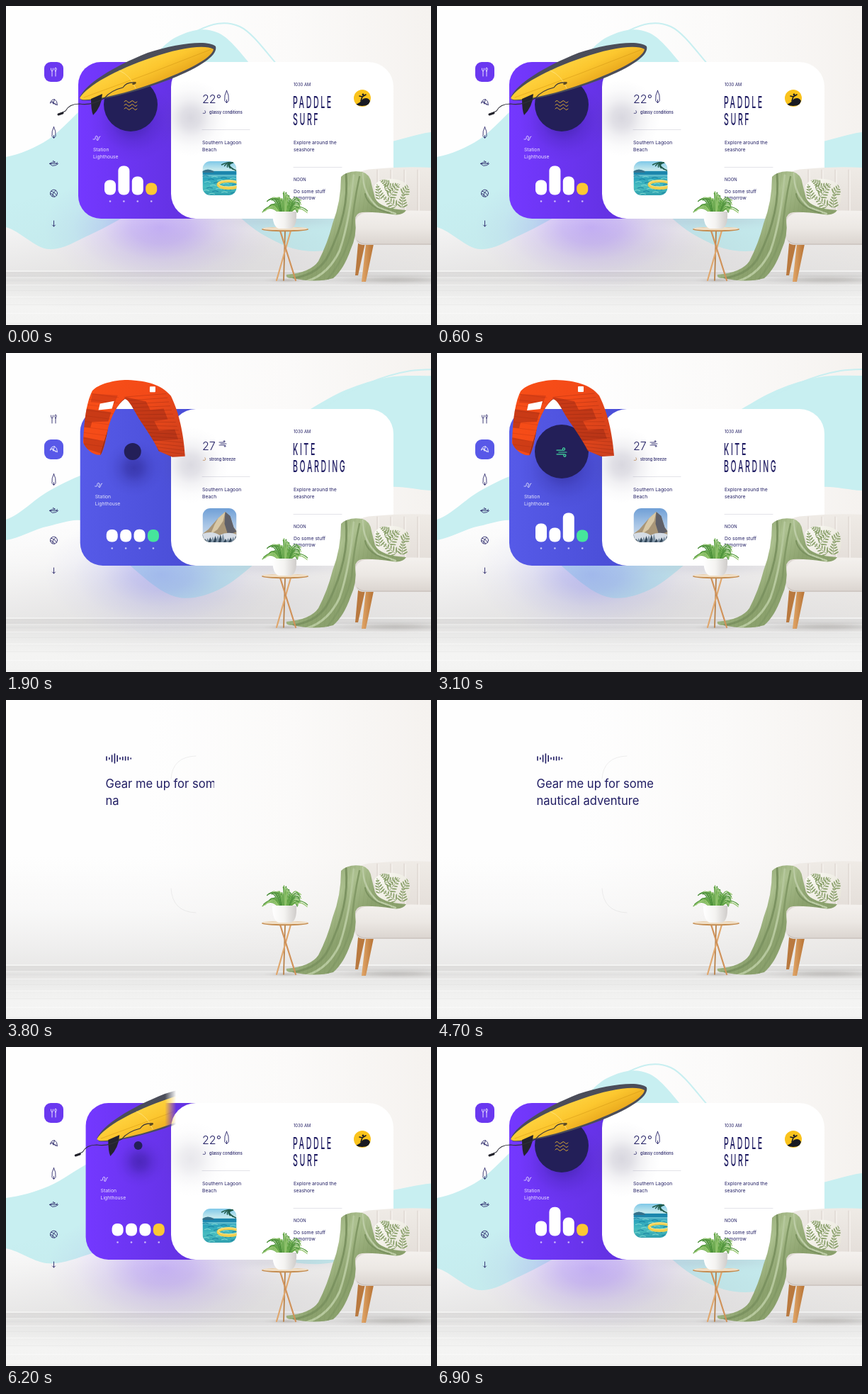
An HTML page with a canvas that plays this animation: 600x450 px, repeating every 7000 ms.

```html
<!DOCTYPE html>
<html lang="en">
<head>
<meta charset="utf-8">
<title>Gear wall</title>
<style>
html, body { margin: 0; width: 100%; height: 100%; overflow: hidden; background: #fff; }
canvas { display: block; width: 600px; height: 450px; }
</style>
</head>
<body>
<canvas id="stage" width="600" height="450"></canvas>
<script>
const W = 600, H = 450, LOOP = 7000, STEP = 100;
const FONT = 'Inter, "Open Sans", sans-serif';
const NAVY = '#201d63', CYAN = '#c8eff1', CARD = { x: 233, y: 79, w: 314, h: 221 };

const makeLayer = () => Object.assign(document.createElement('canvas'), { width: W, height: H }).getContext('2d');
const stage = document.getElementById('stage').getContext('2d');
const gearLayer = makeLayer();
let c = stage;

// Timing helpers
const lin = p => p, easeIn = p => p * p, smooth = p => p * p * (3 - 2 * p), easeOut = p => 1 - (1 - p) ** 4;
const mix = (a, b, p) => Array.isArray(a) ? a.map((v, i) => mix(v, b[i], p)) : a + (b - a) * p;
function track(t, keys) {
  if (t <= keys[0][0]) return keys[0][1];
  for (let i = 1; i < keys.length; i++) {
    const [t0, a] = keys[i - 1], [t1, b, ease = smooth] = keys[i];
    if (t < t1) return mix(a, b, ease((t - t0) / (t1 - t0)));
  }
  return keys[keys.length - 1][1];
}
const cardOpen = t => track(t, [[3220, 1], [3620, 0], [5380, 0], [5980, 1]]);

// Drawing helpers
const shape = d => new Path2D(d);
function fill(path, color) { c.fillStyle = color; c.fill(path); }
function line(d, color, width = 1) {
  c.strokeStyle = color; c.lineWidth = width; c.lineCap = c.lineJoin = 'round';
  c.stroke(shape(d));
}
function box(x, y, w, h, r, color) {
  const p = new Path2D();
  p.roundRect(x, y, w, h, r);
  if (color) fill(p, color);
  return p;
}
function oval(x, y, rx, ry, color, turn = 0) {
  const p = new Path2D();
  p.ellipse(x, y, rx, ry, turn, 0, 7);
  if (color) fill(p, color);
  return p;
}
function ramp(x0, y0, x1, y1, ...colors) {
  const g = c.createLinearGradient(x0, y0, x1, y1);
  colors.forEach((v, i) => g.addColorStop(i / (colors.length - 1), v));
  return g;
}
function blur(x, y, rx, ry, rgb, alpha) {
  c.save();
  c.translate(x, y); c.scale(rx, ry);
  const g = c.createRadialGradient(0, 0, 0, 0, 0, 1);
  [1, .78, .35, .1, 0].forEach((k, i) => g.addColorStop(i / 4, `rgba(${rgb},${alpha * k})`));
  c.fillStyle = g; c.fillRect(-1, -1, 2, 2);
  c.restore();
}
function text(s, x, y, size = 6.8, color = NAVY, weight = 400) {
  c.font = `${weight} ${size}px ${FONT}`;
  c.fillStyle = color;
  c.fillText(s, x, y);
}
function heading(s, x, y) {
  c.save();
  c.translate(x, y); c.scale(.45, 1);
  c.letterSpacing = '5.8px';
  text(s, 0, 0, 23.5, NAVY, 500);
  c.restore();
}
function inside(path, draw) {
  c.save(); c.clip(path); draw(); c.restore();
}

// Room
function wall() {
  c.fillStyle = ramp(0, 0, W, 0, '#fefefe', '#fefefe', '#fbfaf9', '#f5f2ef');
  c.fillRect(0, 0, W, H);
  c.fillStyle = ramp(0, 220, 0, 374, 'rgba(225,224,223,0)', 'rgba(224,223,222,.2)', 'rgba(220,219,218,.6)');
  c.fillRect(0, 220, W, 154);
  c.fillStyle = ramp(0, 374, 0, 450, '#dddcdb', '#ebebea', '#f4f4f3', '#f3f3f2');
  c.fillRect(0, 374, W, 76);
  c.fillStyle = '#f3f3f2'; c.fillRect(0, 373, W, 2);
  for (let i = 0; i < 9; i++) {
    c.fillStyle = i % 2 ? 'rgba(255,255,255,.5)' : 'rgba(200,199,197,.2)';
    c.fillRect(0, 380 + i * i * .8 + i * 2, W, 1);
  }
}

function fern(x, y, turn, size) {
  c.save();
  c.translate(x, y); c.rotate(turn);
  line(`M0 0V${-size}`, '#7e955f', .7);
  for (let k = .1; k < 1; k += .18)
    for (const side of [-1, 1])
      oval(side * size * .18 * (1.2 - k), -size * k, size * .19 * (1.15 - k), .95, '#8ba16c', -side * .6);
  c.restore();
}

function sofa() {
  blur(550, 386, 120, 10, '120,115,110', .3);
  fill(shape('M497 335H507L497 380H493Z'), '#b9793f');
  fill(shape('M508 336H519L508 389H502Z'), ramp(504, 0, 518, 0, '#dda163', '#b87537'));
  fill(shape('M488 250Q492 231 518 230Q560 226 600 228V320H495Z'), ramp(0, 228, 0, 300, '#efebe6', '#e3ddd8'));
  for (let x = 524; x < 600; x += 19) {
    line(`M${x} 231V292`, '#dad2cc');
    line(`M${x + 2} 232V290`, '#f5f1ed', 1.5);
  }
  fill(shape('M482 250Q482 243 490 247Q500 257 501 296L500 333Q492 333 488 315Z'), '#dfd9d4');
  fill(shape('M506 292Q550 287 600 289V337H503Q494 336 493 326V306Q495 294 506 292Z'),
    ramp(0, 288, 0, 337, '#f4f1ee', '#ece8e4', '#dad4cf'));
  line('M496 331Q500 336 510 336H600', '#bfb7b1', .8);

  const pillow = shape('M520 254Q526 242 547 244Q568 246 570 262Q574 284 556 286Q528 291 523 276Z');
  fill(pillow, ramp(520, 245, 570, 285, '#fbfaf4', '#e7e4d9'));
  inside(pillow, () => {
    [[528, 272, -.2, 21], [541, 269, .7, 23], [535, 258, 1.2, 20], [550, 283, -.9, 23],
     [559, 284, .1, 21], [561, 265, .6, 20], [540, 252, -1, 16]].forEach(a => fern(...a));
  });
}

function blanket() {
  const cloth = shape('M473 241Q483 231 503 234Q514 237 516 251L521 271Q528 286 565 288Q560 296 546 294Q518 290 503 291Q493 292 493 302Q496 324 486 345Q477 371 462 384Q438 391 404 384Q394 384 396 379Q430 376 441 360Q454 335 461 307Q473 276 473 241Z');
  fill(cloth, ramp(440, 240, 505, 300, '#8ba26e', '#acc08f', '#8ba16d'));
  inside(cloth, () => {
    line('M480 237Q485 290 456 350Q443 378 406 384', '#7c9361', 3);
    line('M491 239Q486 300 471 345Q455 379 425 388', '#b7c99e', 3);
    line('M499 241Q490 282 488 315Q480 354 453 387', '#839a67', 2.5);
    line('M504 236Q503 264 525 284L550 293', '#bccca5', 2.5);
    line('M507 265Q510 284 542 292', '#7c9361', 2);
    for (let i = 0; i < 26; i++) line(`M${395 + i * 6} 388l20 -155`, 'rgba(96,120,70,.13)', .7);
  });
}

function tableAndPlant() {
  blur(396, 387, 34, 4, '120,110,100', .3);
  line('M394 317L392 387', '#b67d43', 1.7);
  line('M402 317L382 387', '#dfa76e', 2.2);
  line('M387 317L409 387', '#d0925a', 2.2);
  oval(394, 315, 33, 3.3, '#c48c50');
  oval(394, 314, 32, 2.3, '#f0dec5');
  for (let i = 0; i < 52; i++) {
    const a = Math.PI * (.03 + .94 * ((i * .618) % 1)), len = 17 + (i * 7) % 15;
    const root = 393 + Math.cos(a) * 8, dx = Math.cos(a) * len, dy = Math.sin(a) * len * .85;
    line(`M${root} 292Q${root + dx * .4} ${283 - dy} ${393 + dx * 1.08} ${289 - dy + Math.abs(dx) * .2}`,
      ['#4b8f3a', '#70b04f', '#9cca76', '#5c9f45'][i % 4], 1.3);
  }
  fill(shape('M376 290H410Q411 312 402 314H385Q376 311 376 290Z'), ramp(376, 0, 410, 0, '#fff', '#f4f3f1', '#cfccca'));
}

function cache(draw) {
  const layer = makeLayer();
  c = layer; draw(); c = stage;
  return layer.canvas;
}
const back = cache(wall);
const front = cache(() => { sofa(); blanket(); tableAndPlant(); });

// Waves: top and bottom heights at every 60 px
const SURF = [[213, 188, 134, 98, 44, 38, 100, 165, 200, 192, 178], [312, 343, 322, 290, 255, 275, 321, 345, 335, 280, 245]];
const MID = [[215, 215, 185, 114, 70, 46, 32, 50, 130, 190, 178], [318, 344, 313, 274, 270, 284, 322, 345, 346, 280, 232]];
const KITE = [[235, 195, 168, 162, 160, 150, 122, 85, 52, 34, 32], [264, 244, 240, 304, 344, 334, 290, 240, 205, 189, 194]];
const FLAT = [[213, 213, 217, 222, 222, 220, 219, 221, 225, 224, 221], [230, 232, 232, 229, 226, 228, 229, 229, 229, 228, 227]];
const NONE = FLAT.map(edge => edge.map(() => 223));

function curve(path, ys, back) {
  const last = ys.length - 1, at = i => ys[Math.max(0, Math.min(last, i))];
  const dir = back ? -1 : 1, start = back ? last : 0;
  path.lineTo(start * 60, ys[start]);
  for (let n = 0; n < last; n++) {
    const i = start + n * dir, j = i + dir;
    path.bezierCurveTo((i + dir / 3) * 60, at(i) + (at(j) - at(i - dir)) / 6,
      (j - dir / 3) * 60, at(j) - (at(j + dir) - at(i)) / 6, j * 60, at(j));
  }
}
function waves(t) {
  const [top, bottom] = track(t, [[650, SURF], [1100, MID, easeIn], [2100, KITE, easeOut], [3200, KITE],
    [3600, NONE], [5300, NONE], [5500, FLAT], [6650, SURF]]);
  if (bottom[0] - top[0] < 1) return;
  const body = new Path2D(), edge = new Path2D();
  curve(body, top); curve(body, bottom, true);
  curve(edge, top);
  fill(body, CYAN);
  c.save();
  c.translate(30, -9);
  c.strokeStyle = CYAN; c.lineWidth = 2;
  c.globalAlpha = Math.min(1, (bottom[0] - top[0]) / 30);
  c.beginPath(); c.rect(210, 0, 400, 110); c.clip();
  c.stroke(edge);
  c.restore();
}

// Icons, centred on the origin
const ICONS = {
  oars: 'M-2.5 -1V6M2.5 -1V6M-4 -5Q-4 -1 -2.5 -1Q-1 -1 -1 -5M2.5 -1Q0 -5 2.5 -6Q5 -5 2.5 -1',
  kite: 'M-5 1Q-4 -4 1 -4Q5 -2 5 4Q2 1 -1 2L-2 -1L-5 1M-2 -1L3 4M1 -4L-1 2',
  board: 'M0 -8Q-3.4 -2 -2.5 5L0 8L2.5 5Q3.4 -2 0 -8M0 4V7',
  ski: 'M-6 1H6Q4 4 -2 4L-6 1L-2 -1H2L-1 -3M3 1L5 -1',
  ball: 'M5 0A5 5 0 1 1 -5 0A5 5 0 1 1 5 0M-4 -3Q1 -2 4 3M-2 4Q-1 -2 3 -4M-5 1Q-2 -1 1 5',
  down: 'M0 -4V4M-2 2L0 4L2 2',
  wind: 'M-5 -2H1Q4 -2 3 -4Q1 -5 1 -3M-3 0H5M-5 2H2Q5 2 4 4Q2 5 2 3',
  sea: 'M-9 -5q2.2 -3 4.5 0t4.5 0t4.5 0t4.5 0M-9 0q2.2 -3 4.5 0t4.5 0t4.5 0t4.5 0M-9 5q2.2 -3 4.5 0t4.5 0t4.5 0t4.5 0',
  route: 'M-5 2H-3Q-1 2 -2 -1Q-1 -4 1 -2Q2 0 0 3Q2 5 3 1Q3 -2 5 -2',
  leaf: 'M-2 2H1Q3 1 1 -2'
};
function icon(name, x, y, color = NAVY, scale = 1, width = .85) {
  c.save();
  c.translate(x, y); c.scale(scale, scale);
  line(ICONS[name], color, width);
  c.restore();
}

function menu(t) {
  const alpha = track(t, [[3200, 1], [3500, 0], [5700, 0], [6200, 1]]);
  if (!alpha) return;
  const pos = t < 4500 ? track(t, [[700, 0], [1000, 1]]) : 0;
  c.save();
  c.globalAlpha = alpha;
  box(54, 79 + pos * 43, 27, 28, 9, `rgb(${mix([106, 56, 240], [88, 88, 232], pos)})`);
  ['oars', 'kite', 'board', 'ski', 'ball', 'down'].forEach((name, i) =>
    icon(name, 67.5, 93 + i * 42.8, Math.abs(i - pos) < .5 ? '#fff' : NAVY));
  c.restore();
}

// Coloured side panel
function panel(t, kite) {
  const fold = track(t, [[700, 0], [1300, 1], [1400, 1], [2200, 0, easeOut], [3200, 0], [3550, 1], [5750, 1], [6700, 0, easeOut]]);
  const open = cardOpen(t);
  const shift = 138 * fold, left = 102 + shift;
  blur(300, 345, 400, 105, '85,78,100', .1 * open);
  blur(218 + shift * .4, 312, 165, 92, kite ? '104,104,240' : '122,66,255', .36 * (1 - .65 * fold) * open);
  if (fold > .98) return;
  const body = box(left, 79, 272 - left, 221, [32, 0, 0, 32]);
  fill(body, kite ? ramp(left, 0, left + 140, 0, '#565ae8', '#4b4fd8') : ramp(left, 0, left + 140, 0, '#7438ff', '#6432e4'));
  inside(body, () => {
    c.translate(shift, 0);
    const size = track(t, [[700, 1], [1050, 0], [1660, 0], [2300, 1], [3200, 1], [3450, 0], [6050, 0], [6650, 1]]);
    blur(178, 162, 32 + 30 * size, 32 + 26 * size, '25,15,100', .4 * (1 - fold));
    oval(176, 139, 38 * size, 38 * size, '#231f58');
    if (size > .5) icon(kite ? 'wind' : 'sea', 176, 140, kite ? '#43dba0' : '#f6bf31', size * (kite ? 1.4 : 1));
    const pale = 'rgba(255,255,255,.85)';
    icon('route', 128, 186, pale);
    text('Station', 123, 205, 6.8, pale);
    text('Lighthouse', 123, 214.5, 6.8, pale);
    const grow = track(t, [[700, 1], [1300, 0], [1850, 0], [2700, 1], [3200, 1], [3500, 0], [6150, 0], [6950, 1]]);
    (kite ? [26, 20, 41, 17] : [21, 41, 26, 17]).forEach((h, i) => {
      const tall = mix(17.5, h, grow), x = 139 + i * 19.4;
      box(x, 266.5 - tall, 16, tall, 7, i < 3 ? '#fff' : kite ? '#46e59c' : '#fcc833');
      oval(x + 8, 275.5, 1.3, 1.3, 'rgba(255,255,255,.65)');
    });
  });
}

// White card
function lagoonPicture() {
  c.fillStyle = ramp(0, 0, 0, 48, '#7fc8e8', '#c6e9ee', '#2aa3bb', '#48bdc0', '#2f9fae');
  c.fillRect(0, 0, 48, 48);
  c.fillStyle = '#1c86ad'; c.fillRect(0, 14, 48, 5);
  fill(shape('M0 14Q7 9 16 14V16H0Z'), '#35718b');
  for (let i = 0; i < 22; i++) line(`M${i * 13 % 44} ${21 + i * 1.2}q4 -2 8 0`, i % 2 ? '#83dcd5' : '#187f9f', 1);
  c.strokeStyle = '#f2cf4e'; c.lineWidth = 4; c.stroke(oval(37, 33, 15, 5));
  c.strokeStyle = '#fbe99b'; c.lineWidth = 1; c.stroke(oval(37, 31.5, 15, 4.5));
  for (let i = 0; i < 6; i++) line(`M43 2Q${36 - i} ${i} ${27 + i * 4} ${5 + i * 1.6}`, '#215b4b', 1.5);
}
function mountainPicture() {
  c.fillStyle = ramp(0, 0, 0, 48, '#6f9fd6', '#a9c6e6', '#dfe4ea');
  c.fillRect(0, 0, 48, 48);
  fill(shape('M0 36L8 30L14 23L22 14L32 5L39 11L44 27L48 32V48H0Z'), '#a99678');
  fill(shape('M32 5L39 11L44 27L48 33L36 38L31 22Z'), '#5f6069');
  fill(shape('M22 14L32 5L29 18L21 30L11 37L17 23Z'), '#d8c8a6');
  fill(shape('M0 36Q14 31 24 38Q36 32 48 37V48H0Z'), '#d5dce5');
  for (let i = 0; i < 15; i++) {
    const x = i * 3.6, y = 36 + i * 7 % 8;
    fill(shape(`M${x - 3} 48L${x} ${y}L${x + 3} 48Z`), i % 2 ? '#34495c' : '#7d91a3');
  }
}
function badge() {
  const disc = oval(503, 130, 12, 12, '#fac31c');
  inside(disc, () => {
    fill(shape('M493 139Q500 137 504 131Q511 128 514 134L512 139Q503 143 493 139Z'), '#191a22');
    line('M501 134L503 128L499 127M503 128L508 125M503 133L506 134', '#191a22', 1.6);
    oval(504, 125, 1.4, 1.4, '#191a22');
  });
}
function weather(kite, lift) {
  text(kite ? '27' : '22°', 277, 137, 16, NAVY, 300);
  icon(kite ? 'wind' : 'board', kite ? 306 : 311.5, 128, NAVY, kite ? 1 : 1.1, .8);
  icon('leaf', 280, 149.5, kite ? '#c58a4b' : NAVY, .9);
  text(kite ? 'strong breeze' : 'glassy conditions', 287, 151.5, 5.6, NAVY, 500);
  line('M277 174.5H344', '#dcdce4', .8);
  text('Southern Lagoon', 277, 194.5);
  text('Beach', 277, 204.5);
  c.save();
  c.translate(277.5, 219 + lift);
  inside(box(0, 0, 48, 48, 11), kite ? mountainPicture : lagoonPicture);
  c.restore();
}
function agenda(kite) {
  text('1030 AM', 406, 113, 5.8);
  heading(kite ? 'KITE' : 'PADDLE', 405, 144);
  heading(kite ? 'BOARDING' : 'SURF', 405, 168);
  if (!kite) badge();
  text('Explore around the', 406, 194.5);
  text('seashore', 406, 204.5);
  line('M406 227.5H474', '#dcdce4', .8);
  text('NOON', 406, 246.5, 5.8);
  text('Do some stuff', 406, 263.5);
  text('tomorrow', 406, 273);
}
function card(t) {
  const open = cardOpen(t);
  const { x, y, w, h } = CARD;
  if (open < 1) line('M233 111Q235 80 268 79M233 266Q235 299 268 300', 'rgba(190,190,190,.35)', .7);
  if (open < .01) return;
  const width = w * open, body = box(x, y, width, h, Math.min(35, width / 2));
  blur(x + width / 2, 302, width * .55, 18, '150,150,175', .2);
  fill(body, '#fff');
  inside(body, () => {
    const roll = t < 4500 ? track(t, [[680, 0], [1900, 1]]) : 0;
    const lift = t < 4500 ? track(t, [[1300, 6], [2100, 0, easeOut]]) : track(t, [[6000, 10], [6900, 2], [7000, 0]]);
    const place = (dy, draw) => { c.save(); c.translate(0, dy); draw(); c.restore(); };
    place(-roll * h, () => weather(false, t < 1300 ? 0 : lift));
    place((1 - roll) * h, () => weather(true, lift));
    place(roll * h, () => agenda(false));
    place((roll - 1) * h, () => agenda(true));
  });
}

// Floating gear
function surfboard() {
  fill(shape('M104 129C112 110 150 86 200 66C240 53 285 47 296 57C299 68 280 83 240 100C190 120 130 136 107 133Z'), '#4b4d59');
  fill(shape('M104 130C115 112 155 90 205 73C245 59 281 54 293 61C291 71 270 84 236 98C190 118 130 134 107 132Z'),
    ramp(180, 70, 205, 120, '#ffd645', '#fcc72f', '#e7a51b'));
  line('M110 129Q200 97 290 61', 'rgba(190,130,10,.45)', .8);
  line('M160 91Q176 98 183 116', 'rgba(255,238,160,.7)', .8);
  fill(shape('M120 131L136 124Q135 142 123 154Q120 147 120 131Z'), '#24242e');
  line('M182 108Q170 107 165 115Q148 119 139 130Q120 141 104 138Q89 138 84 148L76 152', '#30303b', 1.1);
  line('M74 153L80 151', '#22222b', 3);
  oval(181, 109, 3, 1.7, '#5e4b20', -.4);
}
function kiteWing() {
  const wing = shape('M106 127C107 100 109 72 118 54C126 44 150 38 168 38C195 39 216 44 229 60C238 78 247 105 250 145L232 146L213 138C204 120 192 104 184 92C176 79 170 66 164 65C154 72 146 88 141 106C138 122 136 135 131 144C122 146 110 137 106 127Z');
  fill(wing, ramp(106, 40, 249, 130, '#f94f17', '#f34a18', '#cf401c'));
  inside(wing, () => {
    const dark = 'rgba(150,38,20,.48)';
    fill(shape('M108 79L145 84L141 97L118 98L116 106L106 105Z'), dark);
    fill(shape('M118 58L154 60L149 72L116 70Z'), 'rgba(170,40,18,.35)');
    fill(shape('M163 62L194 68L200 80L219 78L225 93L206 96L213 109L235 107L240 121L205 124Z'), dark);
    fill(shape('M106 119L139 126L134 143L108 135Z'), 'rgba(160,42,22,.45)');
    for (let i = 0; i < 17; i++) {
      line(`M${166 + i * 3} ${62 + i * 5}L${222 + i * 2} ${57 + i * 5.7}`, 'rgba(105,25,15,.3)', .8);
      if (i < 10) line(`M106 ${57 + i * 8}L155 ${63 + i * 8}`, 'rgba(130,30,15,.25)', .7);
    }
    line('M164 65C154 72 146 88 131 144M164 65Q181 92 213 138', '#8e2d1d', 1.2);
  });
  fill(shape('M129 72L149 68L146 79L127 81Z'), '#fff');
  box(199, 47, 8, 8, 1, '#fff');
}
function gear(t, kite) {
  const away = track(t, [[700, 0], [1400, 1, easeIn], [2200, 0, easeOut], [3200, 0], [3560, 1, easeIn], [5850, 1], [6750, 0, easeOut]]);
  if (away > .97) return;
  const shift = away * 174, edge = 238 + 80 * (1 - Math.min(1, shift / 25));
  blur(261, 158, 54, 54, '80,75,110', .22 * (1 - Math.min(1, away * 3)));
  c = gearLayer;
  c.globalCompositeOperation = 'source-over';
  c.clearRect(0, 0, W, H);
  c.save();
  c.translate(shift, 0);
  if (kite) {
    const tilt = .012 * track(t, [[1900, 1], [3100, 0]]);
    c.translate(178, 90); c.rotate(tilt); c.translate(-178, -90);
    kiteWing();
  } else surfboard();
  c.restore();
  c.globalCompositeOperation = 'destination-out';
  c.fillStyle = ramp(edge - 16, 0, edge, 0, 'rgba(0,0,0,0)', '#000');
  c.fillRect(edge - 16, 0, W, H);
  c = stage;
  c.drawImage(gearLayer.canvas, 0, 0);
}

// Voice request
function voice(t) {
  const alpha = track(t, [[3400, 0], [3600, 1], [4900, 1], [5250, 0]]);
  if (!alpha) return;
  c.save();
  c.globalAlpha = alpha;
  [5, 2, 9, 13, 8, 2, 4, 5, 4, 1].forEach((h, i) => {
    const x = 142 + i * 3.8;
    line(`M${x} ${82.5 - h / 2}V${82.5 + h / 2}`, NAVY, 1.6);
  });
  const reveal = (s, y, width) => {
    const p = new Path2D();
    p.rect(138, y - 20, 3 + width, 30);
    inside(p, () => text(s, 140.5, y, 16.6));
  };
  reveal('Gear me up for some', 124, track(t, [[3500, 0], [3800, 153, lin], [4000, 190, easeOut]]));
  reveal('nautical adventure', 148, track(t, [[3750, 0], [3800, 19, lin], [4400, 190, lin]]));
  c.restore();
}

function render(t) {
  const kite = t >= 1350 && t < 4500;
  c.drawImage(back, 0, 0);
  waves(t);
  panel(t, kite);
  card(t);
  gear(t, kite);
  menu(t);
  voice(t);
  c.drawImage(front, 0, 0);
}

const begin = performance.now();
let shown = -1;
function tick() {
  const t = Math.floor((performance.now() - begin) % LOOP / STEP) * STEP;
  if (t !== shown) render(shown = t);
  requestAnimationFrame(tick);
}
tick();
</script>
</body>
</html>
```
